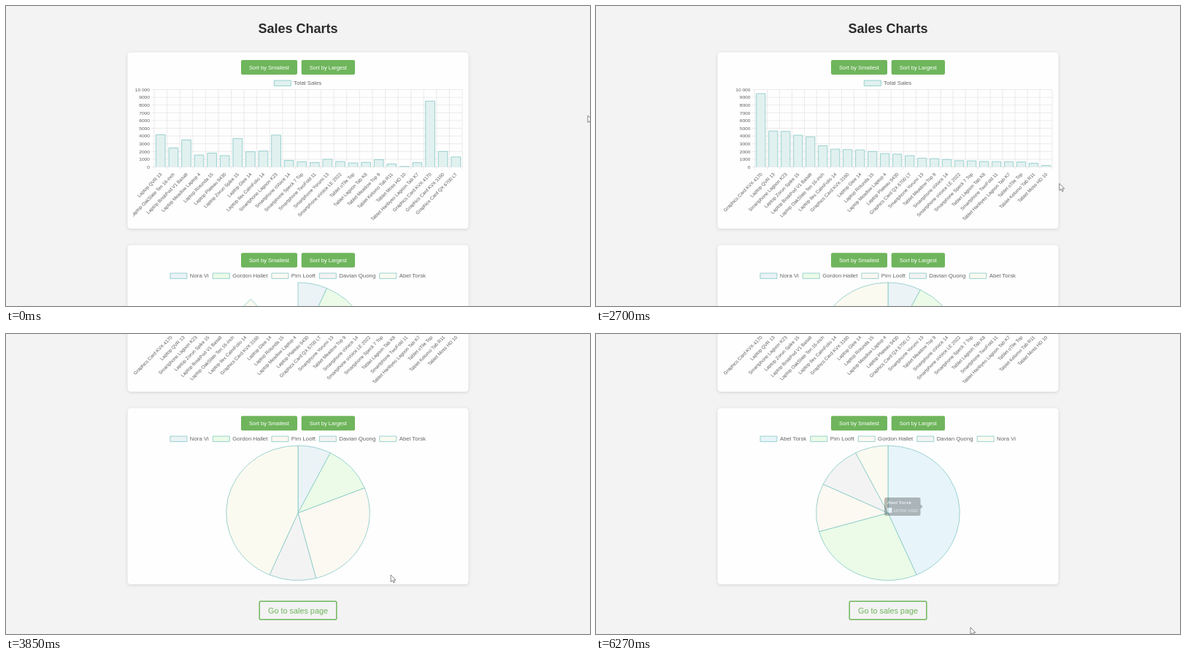
An HTML page for the animation above (6300 ms loop, 800 px wide and 411 px high).

```html
<!DOCTYPE html>
<html lang="en">
<head>
<meta charset="utf-8">
<title>Sales Charts</title>
<style>
  html, body { margin: 0; width: 100%; height: 100%; overflow: hidden; background: #f3f3f3; }
  svg { display: block; width: 800px; height: 411px; font-family: "Liberation Sans", Arial, sans-serif; }
  .card { fill: #fefefe; filter: drop-shadow(0 1.5px 2px rgba(0, 0, 0, .13)); }
  .title { font-size: 18px; font-weight: bold; fill: #2b2b2b; text-anchor: middle; }
  .button text { font-size: 7.55px; fill: #fff; text-anchor: middle; }
  .cta rect { fill: none; stroke: #6fb55c; stroke-width: 1.5; }
  .cta text { font-size: 10.85px; fill: #6fb55c; text-anchor: middle; }
  .legend { font-size: 7.35px; fill: #666; }
  .tick { font-size: 6.25px; fill: #5c5c5c; text-anchor: end; }
  .grid { fill: none; stroke: #e3e3e3; stroke-width: .7; }
  .line { stroke: #84c8c5; stroke-width: .8; vector-effect: non-scaling-stroke; }
  .bar { fill: #e1f1f0; }
  .tip text { font-size: 6.2px; fill: #ddd; }
  .cursor path { fill: #fff; stroke: #555; stroke-width: .7; stroke-linejoin: round; }
</style>
</head>
<body>
<svg id="stage" viewBox="0 0 800 411">
  <defs>
    <clipPath id="canvasClip"><rect x="174" y="95" width="452" height="208"/></clipPath>
    <clipPath id="areaClip"><rect id="area" y="95" width="430" height="126"/></clipPath>
  </defs>
  <g id="page">
    <text class="title" x="400" y="36.5">Sales Charts</text>
    <rect class="card" x="166.5" y="63.5" width="467" height="241.5" rx="4.5"/>
    <rect class="card" x="166.5" y="327.5" width="467" height="241.5" rx="4.5"/>
    <g id="buttons"></g>
    <g class="cta">
      <rect x="347.2" y="592.2" width="105.6" height="25" rx="1.5"/>
      <text x="400" y="608.8">Go to sales page</text>
    </g>
    <g id="barChart" clip-path="url(#canvasClip)"></g>
    <g id="pieChart"></g>
  </g>
  <g class="cursor">
    <path id="arrow" d="M0 0V9.6L2.2 7.6L3.8 11L5.3 10.3L3.8 7.1H6.9Z"/>
    <path id="hand" d="M-1 1Q0 -.6 1 1V4.6Q2.1 3.9 2.7 5Q3.8 4.4 4.3 5.5Q5.5 5 5.7 6.4V9Q5.5 10.6 4.6 12.4H-1.2Q-2.6 10.2-4 7.9Q-4.2 6.6-3 6.8L-1 8.4Z"/>
  </g>
</svg>
<script>
const LOOP = 6300, STRETCH = 1.065;
const $ = id => document.getElementById(id);

function add(parent, tag, attrs = {}, text) {
  const el = document.createElementNS("http://www.w3.org/2000/svg", tag);
  set(el, attrs);
  if (text !== undefined) el.textContent = text;
  return parent.appendChild(el);
}
function set(el, attrs) { for (const k in attrs) el.setAttribute(k, attrs[k]); }
const at = (x, y, rest = "") => `translate(${x} ${y}) scale(${STRETCH} 1) ${rest}`;
const clamp = v => Math.min(1, Math.max(0, v));
const mix = (a, b, p) => a + (b - a) * p;
const smooth = p => p * p * (3 - 2 * p);
const easeOut = p => 1 - (1 - clamp(p)) ** 4;

const products = [
  ["Laptop QVR 13", 4700], ["Laptop OakSlate Ten 16-inch", 2770],
  ["Laptop BriskPod V1 Basalt", 3940], ["Laptop Meadow Laptop 4", 1740],
  ["Laptop Rotunda 15", 2010], ["Laptop Plateau 9430", 1660],
  ["Laptop Zorun Spike 15", 4150], ["Laptop Glee 14", 2220],
  ["Laptop Ilex CalmFolio 14", 2320], ["Smartphone Lagoon K23", 4650],
  ["Smartphone oVoice 14", 950], ["Smartphone Speck 7 Top", 760],
  ["Smartphone TwoFold 11", 650], ["Smartphone Yorumi 13", 1120],
  ["Smartphone oVoice LE 2022", 800], ["Tablet oTile Top", 590],
  ["Tablet Lagoon Tab K8", 680], ["Tablet Meadow Top 9", 1060],
  ["Tablet Kelomo Tab R11", 430], ["Tablet Moss HD 10", 70],
  ["Tablet Hanbyeo Lagoon Tab K7", 620], ["Graphics Card KVX 4170", 9600],
  ["Graphics Card KVX 3160", 2260], ["Graphics Card QX 6700 LT", 1460]
];
const people = [["Nora Vi", 26.8], ["Gordon Hallet", 41.4], ["Pim Looft", 97.3], ["Davian Quong", 37.9], ["Abel Torsk", 156.6]];
const up = list => [...list].sort((a, b) => a[1] - b[1]);
const down = list => up(list).reverse();

const barStates = [
  { start: -418, items: products, left: 203 },
  { start: 1060, items: up(products), left: 203 },
  { start: 2040, items: down(products), left: 217.5 }
];
const pieStates = [
  { start: -418, items: people },
  { start: 4160, items: up(people) },
  { start: 4900, items: down(people) }
];

// Current state, the one before it, and the eased progress between them
function phase(states, t) {
  let i = states.length - 1;
  while (i && t < states[i].start) i--;
  return { now: states[i], old: states[i - 1], p: easeOut((t - states[i].start) / 1000) };
}

// Buttons, each with the span of time it is hovered
const buttons = [
  ["Sort by Smallest", 322, 77, 74, 560, 1440],
  ["Sort by Largest", 404.7, 73.3, 74, 1480, 2120],
  ["Sort by Smallest", 322, 77, 338.2, 4100, 4340],
  ["Sort by Largest", 404.7, 73.3, 338.2, 4400, 5965]
].map(([label, x, w, y, on, off]) => {
  const g = add($("buttons"), "g", { class: "button" });
  const rect = add(g, "rect", { x, y, width: w, height: 20, rx: 2 });
  add(g, "text", { x: x + w / 2, y: y + 12.6 }, label);
  return { rect, on, off };
});

function drawButtons(t) {
  for (const { rect, on, off } of buttons) {
    const h = clamp((t - on) / 200) - clamp((t - off) / 200);
    rect.setAttribute("fill", `rgb(${mix(111, 100, h)} ${mix(181, 162, h)} ${mix(92, 82, h)})`);
  }
}

// Bar chart
const TOP = 114.5, BASE = 220.5, RIGHT = 625, UNIT = (BASE - TOP) / 10000;
const chart = $("barChart"), COUNT = products.length;
add(chart, "rect", { class: "bar line", x: 367.3, y: 102, width: 23, height: 7.4 });
add(chart, "text", { class: "legend", transform: at(394, 108.2) }, "Total Sales");
const grid = add(chart, "path", { class: "grid" });
const barLayer = add(chart, "g", { "clip-path": "url(#areaClip)" });
const bars = products.map(() => add(barLayer, "path", { class: "bar line" }));
const names = products.map(() => add(chart, "text", { class: "tick", dy: ".35em" }));
const scale = Array.from({ length: 11 }, (_, i) =>
  add(chart, "text", { class: "tick" }, i === 10 ? "10 000" : i * 1000));
const center = (left, i) => left + (RIGHT - left) * (i + .5) / COUNT;
let shownBars;

function layoutBars(state) {
  const { left, items } = state, step = (RIGHT - left) / COUNT;
  let d = "";
  for (let i = 0; i <= 10; i++) d += `M${left - 3.5} ${BASE - i * 1000 * UNIT}H${RIGHT}`;
  for (let i = 0; i <= COUNT; i++) d += `M${left + i * step} ${TOP}V${BASE + 3.2}`;
  grid.setAttribute("d", d);
  $("area").setAttribute("x", left);
  scale.forEach((el, i) => el.setAttribute("transform", at(left - 6, BASE - i * 1000 * UNIT + 2.3)));
  names.forEach((el, i) => {
    el.textContent = items[i][0];
    el.setAttribute("transform", at(center(left, i) + .5, 229.5, "rotate(-47)"));
  });
  shownBars = state;
}

function drawBars(t) {
  const { now, old, p } = phase(barStates, t);
  if (now !== shownBars) layoutBars(now);
  const left = mix(old ? old.left : now.left, now.left, p);
  const half = (RIGHT - left) / COUNT * .36;
  bars.forEach((el, i) => {
    const x = center(left, i), value = mix(old ? old.items[i][1] : 0, now.items[i][1], p);
    el.setAttribute("d", `M${x - half} ${BASE}V${BASE - value * UNIT}H${x + half}V${BASE}`);
  });
}

// Pie chart
const RADIUS = 92.3, fills = ["#ebf3f7", "#ebfbe8", "#fcf8f2", "#f3f3f3", "#fbfaf1"];
const KEY = 26.9, GAP = 5.5;
const pie = add($("pieChart"), "g", { transform: at(400, 471.2) });
const slices = fills.map(fill => add(pie, "path", { class: "line", fill }));
const keys = fills.map(fill => ({
  box: add($("pieChart"), "rect", { class: "line", fill, y: 366, width: 23, height: 7.4 }),
  text: add($("pieChart"), "text", { class: "legend" })
}));
const tip = add($("pieChart"), "g", { class: "tip" });
add(tip, "path", { fill: "rgba(0,0,0,.8)", d: "M397.5 450H442Q444.5 450 444.5 452.5V459.2L447.6 462.4L444.5 465.6V472.5Q444.5 475 442 475H397.5Q395 475 395 472.5V452.5Q395 450 397.5 450Z" });
add(tip, "text", { transform: at(398.5, 459.3), "font-weight": "bold" }, people[4][0]);
add(tip, "rect", { x: 399, y: 464.3, width: 6, height: 6, fill: "#e7f4fa", stroke: "#fff", "stroke-width": .6 });
add(tip, "text", { transform: at(407, 469.6) }, "10760 USD");
let shownPie;

function layoutLegend(state) {
  state.items.forEach(([name], i) => keys[i].text.textContent = name);
  const widths = keys.map(k => k.text.getComputedTextLength() * STRETCH);
  const total = widths.reduce((sum, w) => sum + w + KEY + GAP, -GAP);
  let x = 400 - total / 2;
  keys.forEach(({ box, text }, i) => {
    box.setAttribute("x", x);
    text.setAttribute("transform", at(x + KEY, 372.2));
    x += widths[i] + KEY + GAP;
  });
  const blue = state === pieStates[2] ? "#e7f4fa" : fills[0];
  slices[0].setAttribute("fill", blue);
  keys[0].box.setAttribute("fill", blue);
  shownPie = state;
}

const edges = items => items.reduce((list, item) => [...list, list[list.length - 1] + item[1]], [0]);
function rim(deg) {
  const a = deg * Math.PI / 180;
  return `${RADIUS * Math.sin(a)} ${-RADIUS * Math.cos(a)}`;
}

function drawPie(t) {
  const { now, old, p } = phase(pieStates, t);
  if (now !== shownPie) layoutLegend(now);
  const to = edges(now.items), from = old ? edges(old.items) : to.map(() => 0);
  const cuts = to.map((a, i) => mix(from[i], a, p));
  slices.forEach((el, i) => {
    const large = cuts[i + 1] - cuts[i] > 180 ? 1 : 0;
    el.setAttribute("d", `M0 0L${rim(cuts[i])}A${RADIUS} ${RADIUS} 0 ${large} 1 ${rim(cuts[i + 1])}Z`);
  });
  tip.setAttribute("opacity", clamp((t - 6010) / 125) - clamp((t - 6135) / 200));
}

// Wheel notches: start, end, distance
const notches = [[2970, 3110, 58.5], [3180, 3310, 58.5], [3310, 3445, 58.5], [3520, 3660, 50.5]];
const scrollAt = t => notches.reduce((y, [a, b, d]) => y + d * smooth(clamp((t - a) / (b - a))), 0);

// Pointer stops: time, x, y
const stops = [
  [0, 797, 150], [40, 797, 150], [620, 362, 77.5], [1380, 362, 77.5], [1580, 432, 81.5],
  [2090, 432, 81.5], [2380, 530, 325], [2660, 632, 255], [2860, 658, 146], [3560, 658, 146],
  [3960, 498, 371], [4130, 364, 119], [4300, 364, 119], [4480, 432, 119.5], [5945, 432, 119.5],
  [6240, 513, 402], [LOOP, 513, 402]
];

function drawPointer(t) {
  const i = stops.findIndex(s => s[0] > t);
  const [t0, x0, y0] = stops[i - 1], [t1, x1, y1] = stops[i];
  const p = smooth((t - t0) / (t1 - t0));
  const hand = buttons.some(b => t >= b.on && t < b.off);
  const transform = `translate(${mix(x0, x1, p)} ${mix(y0, y1, p)})`;
  set($("hand"), { transform, visibility: hand ? "visible" : "hidden" });
  set($("arrow"), { transform, visibility: hand ? "hidden" : "visible" });
}

const begin = performance.now();
function frame() {
  const t = (performance.now() - begin) % LOOP;
  $("page").setAttribute("transform", `translate(0 ${-scrollAt(t)})`);
  drawButtons(t);
  drawBars(t);
  drawPie(t);
  drawPointer(t);
  requestAnimationFrame(frame);
}
frame();
</script>
</body>
</html>
```
